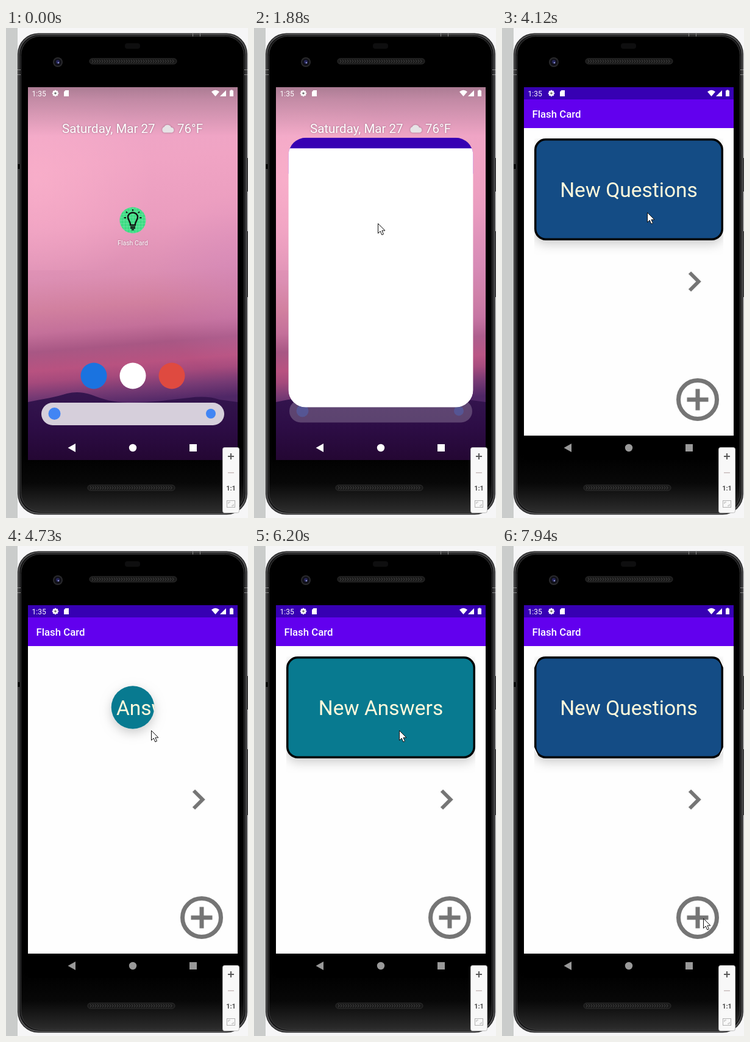
These frames come from a looping animation (397 px wide and 803 px high, 7.99 s). An HTML page with a canvas:

```html
<!DOCTYPE html>
<html lang="en">
<head>
<meta charset="utf-8">
<title>Flash card app</title>
<style>
  html, body { margin: 0; width: 100%; height: 100%; overflow: hidden; background: #f6f6f7; }
  canvas { display: block; }
</style>
</head>
<body>
<canvas id="stage" width="397" height="803"></canvas>
<script>
const ctx = document.getElementById('stage').getContext('2d');
const LOOP = 7990;
const SCREEN = { x: 36, y: 97, w: 344, h: 611 };
const CARD = { x: 53, y: 181, w: 310, h: 167, cx: 208, cy: 264.5 };
const REVEAL_TIME = 2000, SHOW_ANSWER = 4140, SHOW_QUESTION = 6212;
const LAUNCH = 1520, LAUNCH_TIME = 470;
const FULL_RADIUS = Math.hypot(CARD.w, CARD.h) / 2;

const clamp = v => Math.max(0, Math.min(1, v));
const progress = (t, from, to) => clamp((t - from) / (to - from));
const mix = (a, b, p) => a + (b - a) * p;
const smooth = p => p * p * (3 - 2 * p);

function scoped(draw) {
  ctx.save();
  draw();
  ctx.restore();
}

function rect(x, y, w, h, fill) {
  ctx.fillStyle = fill;
  ctx.fillRect(x, y, w, h);
}

function rounded(x, y, w, h, r, fill, stroke, lineWidth = 1) {
  ctx.beginPath();
  ctx.roundRect(x, y, w, h, r);
  if (fill) { ctx.fillStyle = fill; ctx.fill(); }
  if (stroke) { ctx.strokeStyle = stroke; ctx.lineWidth = lineWidth; ctx.stroke(); }
}

function circle(x, y, r, fill) {
  ctx.beginPath();
  ctx.arc(x, y, r, 0, 7);
  ctx.fillStyle = fill;
  ctx.fill();
}

function shape(d, fill, stroke, lineWidth) {
  const path = new Path2D(d);
  if (fill) { ctx.fillStyle = fill; ctx.fill(path); }
  if (stroke) { ctx.strokeStyle = stroke; ctx.lineWidth = lineWidth; ctx.stroke(path); }
}

function label(text, x, y, size, fill, { weight = 400, align = 'left' } = {}) {
  ctx.font = `${weight} ${size}px Roboto, sans-serif`;
  ctx.textAlign = align;
  ctx.fillStyle = fill;
  ctx.fillText(text, x, y);
}

function withStops(g, stops) {
  stops.forEach(([at, color]) => g.addColorStop(at, color));
  return g;
}

const gradient = (x0, y0, x1, y1, ...stops) => withStops(ctx.createLinearGradient(x0, y0, x1, y1), stops);

const glow = (x, y, r, rgb, alpha) => withStops(ctx.createRadialGradient(x, y, 0, x, y, r),
  [[0, `rgba(${rgb},${alpha})`], [1, `rgba(${rgb},0)`]]);

function speaker(x, y) {
  rounded(x, y, 143, 9, 4.5, '#191919', '#303030');
  for (let i = 0; i < 34; i++) {
    const sx = x + 4 + i * 4;
    shape(`M${sx} ${y + 2}l2 2.5l-2 2.5`, null, '#4a4a4a', 1);
  }
}

function phone() {
  rect(0, 0, 397, 803, '#f6f6f7');
  rect(0, 0, 19, 803, '#cacccb');
  rect(394, 213, 3, 55, '#4a4a4b');
  rect(394, 333, 3, 108, '#4a4a4b');
  rounded(19, 8.5, 377, 789, 34, '#2b2b2c');
  rounded(20.5, 10, 374, 786, 33, '#5a5a5b');
  rounded(22, 11.5, 371, 783, 32, '#161617');
  rounded(24.5, 13.5, 366, 779, 31, gradient(0, 700, 0, 792, [0, '#000'], [.5, '#080808'], [1, '#2c2c2c']), '#3c3c3d');
  for (const y of [68, 76]) {
    rect(19, y, 5, 1, '#888');
    rect(391, y, 5, 1, '#888');
  }
  rect(306, 9, 1, 5, '#888');
  rect(318, 9, 1, 5, '#888');
  rect(19, 223, 4, 8, '#0b0b0b');
  rounded(195, 25, 25, 9, 4, '#0e0e0f');
  circle(85, 56, 8, '#29292b');
  circle(85, 56, 6, '#101018');
  circle(85, 55.5, 3, '#262659');
  circle(86, 57, 1.3, '#8c91d0');
  speaker(137, 50);
  speaker(134, 749);
}

function toolbar() {
  rounded(355.5, 687.5, 27, 107, 3, '#f8f8f8', '#bcbcbc');
  rect(364, 701, 10, 2, '#595959');
  rect(368, 697, 2, 10, '#595959');
  rect(364, 728, 10, 1.5, '#c9bcbc');
  label('1:1', 369, 758, 11, '#4c4c4c', { weight: 700, align: 'center' });
  ctx.strokeStyle = '#b2b2b2';
  ctx.lineWidth = 1;
  ctx.strokeRect(362.5, 774.5, 13, 11);
  shape('M365 780v-3h3M373 780v3h-3', null, '#b2b2b2', 1);
}

function wallpaper() {
  const { x, y, w, h } = SCREEN;
  rect(x, y, w, h, gradient(170, 97, 220, 708,
    [0, '#eda6c8'], [.2, '#f0a4c4'], [.36, '#eb9dbf'], [.5, '#dc8fb3'], [.58, '#d1809f'],
    [.64, '#c4709a'], [.69, '#a85784'], [.74, '#b85280'], [.77, '#a64a7c'], [.81, '#763a74'], [.85, '#4f2766']));
  rect(x, y, w, 300, glow(50, 250, 190, '255,182,206', .55));
  rect(x, y, w, h, glow(390, 420, 150, '205,130,190', .4));
  rect(x, y, w, 80, gradient(0, y, 0, y + 80, [0, 'rgba(80,65,75,.42)'], [.25, 'rgba(80,65,75,.28)'], [1, 'rgba(80,65,75,0)']));
  shape('M36 613C60 608 82 605 100 599Q119 594 140 601C160 609 175 613 200 614C240 614 270 609 300 606Q330 602 350 609L380 613V708H36Z',
    gradient(0, 597, 0, 708, [0, '#35164f'], [.5, '#2d0d46'], [1, '#240733']));
}

function bulbIcon(x, y, r, alpha) {
  scoped(() => {
    ctx.globalAlpha = alpha;
    ctx.translate(x, y);
    ctx.scale(r / 21.5, r / 21.5);
    ctx.beginPath();
    ctx.arc(0, 0, 21.5, 0, 7);
    ctx.clip();
    rect(-22, -22, 44, 44, '#3ddc84');
    for (let i = -20; i <= 20; i += 5) {
      rect(i, -22, .5, 44, 'rgba(255,255,255,.3)');
      rect(-22, i, 44, .5, 'rgba(255,255,255,.3)');
    }
    shape('M-3.8 8C-3.8 2-8-.5-8-5A8 7.5 0 0 1 8-5C8-.5 3.8 2 3.8 8Z', null, '#111', 2.5);
    shape('M-4 10.8H4M-4 13.2H4M-2 15.5H2M-14.5-4H-11M11-4H14.5M0-18V-15M-11-14l2 2M11-14l-2 2', null, '#111', 1.8);
  });
}

function home(t) {
  const u = progress(t, LAUNCH, LAUNCH + LAUNCH_TIME);
  wallpaper();
  scoped(() => {
    ctx.shadowColor = 'rgba(60,30,50,.45)';
    ctx.shadowBlur = 3;
    label('Saturday, Mar 27', 92, 172, 20.5, '#fff');
    label('76°F', 281, 172, 20.5, '#fff');
    shape('M260 171.5a5 5 0 0 1-.5-9.5a6.3 6.3 0 0 1 11.5 1a4.3 4.3 0 0 1 1 8.5Z', '#e6e3e6');
    if (t < LAUNCH) label('Flash Card', 208, 356, 10.5, '#fff', { align: 'center' });
  });
  scoped(() => {
    ctx.globalAlpha = clamp(1 - u * .95);
    ctx.translate(0, -u * 6);
    circle(144, 570, 21.5, '#1a73e0');
    circle(208, 570, 21.5, '#fff');
    circle(272, 570, 21.5, '#df4a40');
    rounded(58, 614, 300, 37, 18.5, '#d6cfdb');
    circle(79.5, 632, 10, '#4285f4');
    circle(336, 632, 8, '#4285f4');
  });
  if (t < LAUNCH) bulbIcon(208, 315, 21.5, 1);
}

// Outline of a circle cut off at the card's top and bottom.
function revealOutline(r) {
  const a = r > CARD.h / 2 ? Math.asin(CARD.h / 2 / r) : Math.PI / 2;
  ctx.beginPath();
  ctx.arc(CARD.cx, CARD.cy, r, -a, a);
  ctx.arc(CARD.cx, CARD.cy, r, Math.PI - a, Math.PI + a);
  ctx.closePath();
}

function flashCard(text, color, r) {
  if (r < .5) return;
  const { x, y, w, h, cx, cy } = CARD;
  scoped(() => {
    ctx.beginPath();
    ctx.rect(x, y, w, h + 24);
    ctx.clip();
    scoped(() => {
      ctx.shadowColor = 'rgba(0,0,0,.2)';
      ctx.shadowBlur = 17;
      ctx.shadowOffsetY = 6;
      if (r < 168) revealOutline(r);
      else { ctx.beginPath(); ctx.roundRect(x, y, w, h, 19); }
      ctx.fillStyle = '#fff';
      ctx.fill();
    });
    ctx.beginPath();
    ctx.arc(cx, cy, r, 0, 7);
    ctx.clip();
    rounded(x + 1.75, y + 1.75, w - 3.5, h - 3.5, 17, color, '#000', 3.5);
    label(text, cx, 277, 33.5, '#fff9dc', { align: 'center' });
  });
}

function revealRadius(t, start) {
  return FULL_RADIUS * (.5 - .5 * Math.cos(Math.PI * progress(t, start, start + REVEAL_TIME)));
}

function app(t) {
  rect(36, 97, 344, 20, '#3700b3');
  rect(36, 117, 344, 551, '#fefefe');
  rect(36, 117, 344, 47, '#6200ee');
  label('Flash Card', 49.5, 147, 16.8, '#fff', { weight: 500 });
  if (t >= SHOW_ANSWER && t < SHOW_QUESTION) {
    flashCard('New Answers', '#087a90', revealRadius(t, SHOW_ANSWER));
  } else {
    const r = t < SHOW_ANSWER ? FULL_RADIUS : revealRadius(t, SHOW_QUESTION);
    flashCard('New Questions', '#144c85', r);
  }
  shape('M308 401L322.5 415.5L308 430', null, '#757575', 6);
  ctx.beginPath();
  ctx.arc(321, 609, 31.5, 0, 7);
  ctx.lineWidth = 7;
  ctx.stroke();
  rect(303.5, 605.5, 35, 7, '#757575');
  rect(317.5, 591.5, 7, 35, '#757575');
  const veil = 1 - progress(t, 2290, 2635);
  rect(36, 117, 344, 551, `rgba(255,255,255,${veil})`);
  rect(36, 668, 344, 40, '#000');
}

function appWindow(t) {
  const u = progress(t, LAUNCH, LAUNCH + LAUNCH_TIME);
  const w = mix(43, SCREEN.w, smooth(u));
  const h = w * mix(1, SCREEN.h / SCREEN.w, u * u);
  const cy = mix(315, 402.5, 1 - (1 - u) ** 2.6);
  const x = 208 - w / 2, y = cy - h / 2;
  scoped(() => {
    ctx.beginPath();
    ctx.roundRect(x, y, w, h, w / 2 * (1 - smooth(clamp(u * 1.2 - .2))));
    ctx.clip();
    ctx.translate(x, y);
    ctx.scale(w / SCREEN.w, w / SCREEN.w);
    ctx.translate(-SCREEN.x, -SCREEN.y);
    app(t);
  });
  const iconAlpha = clamp(1 - u * 1.7);
  if (iconAlpha > 0) bulbIcon(208, cy, w / 2 + 1, iconAlpha);
}

function statusIcons() {
  label('1:35', 42.5, 111.5, 12, '#fff');
  for (let i = 0; i < 4; i++) {
    scoped(() => {
      ctx.translate(81, 107);
      ctx.rotate(i * Math.PI / 4);
      rect(-1.2, -5.2, 2.4, 10.4, '#fff');
    });
  }
  circle(81, 107, 4, '#fff');
  circle(81, 107, 1.8, '#777');
  shape('M97.5 102H103V112H95V104.5Z', '#fff');
  shape('M337 104.5Q343.5 99 350 104.5L343.5 112Z', '#fff');
  shape('M361 102V112H351Z', '#fff');
  shape('M368.5 101.5h3v1h1.5V112h-6V102.5h1.5Z', '#fff');
}

function navIcons(t) {
  const shade = Math.round(mix(255, 153, progress(t, 2430, 2850)));
  const color = `rgb(${shade},${shade},${shade})`;
  shape('M101.5 688L114 681V695Z', color);
  circle(208, 688, 6.2, color);
  rect(301, 682, 12, 12, color);
}

const moves = [
  { from: 90, to: 420, start: [374, 788], end: [240, 406] },
  { from: 680, to: 1300, start: [240, 406], end: [203, 320] },
  { from: 3850, to: 4090, start: [203, 320], end: [238, 302] },
  { from: 6450, to: 7050, start: [238, 302], end: [330, 610] },
];

function cursor(t) {
  const move = moves.findLast(m => t >= m.from);
  if (!move) return;
  const p = smooth(progress(t, move.from, move.to));
  scoped(() => {
    ctx.translate(mix(move.start[0], move.end[0], p) + .5, mix(move.start[1], move.end[1], p) + .5);
    shape('M0 0V16L3.7 12.5L6.3 18.5L9 17.3L6.4 11.5H11.5Z', '#fff', '#111', 1);
  });
}

function frame(now) {
  const t = now % LOOP;
  phone();
  scoped(() => {
    ctx.beginPath();
    ctx.rect(SCREEN.x, SCREEN.y, SCREEN.w, SCREEN.h);
    ctx.clip();
    if (t < LAUNCH + LAUNCH_TIME) home(t);
    if (t >= LAUNCH) appWindow(t);
    statusIcons();
    navIcons(t);
  });
  toolbar();
  cursor(t);
  requestAnimationFrame(frame);
}
requestAnimationFrame(frame);
</script>
</body>
</html>
```
